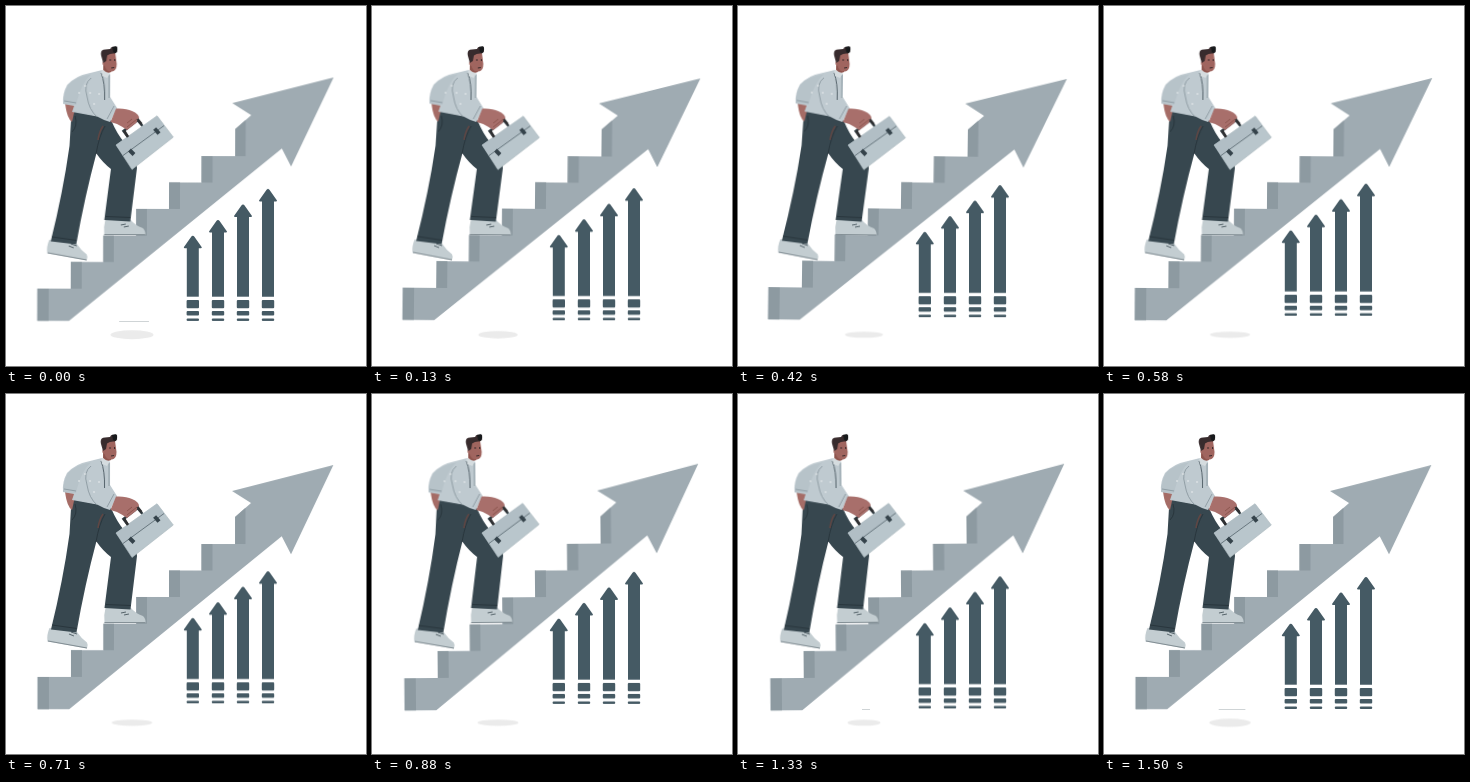
An HTML page that plays this animation: 360 px wide and 360 px high, repeating every 1.54 s.

```html
<!DOCTYPE html>
<html lang="en">
<head>
<meta charset="utf-8">
<title>Climbing the stairs</title>
<style>
  html, body { margin: 0; width: 100%; height: 100%; overflow: hidden; background: #fff; }
  svg { display: block; width: 100%; height: 100%; }
  .sway { animation: sway .77s cubic-bezier(.364, 0, .636, 1) -.435s infinite alternate; }
  .stairs { transform-origin: 179.5px 193px; }
  .man { transform-origin: 104px 147px; }
  .bars { animation: lift .77s cubic-bezier(.364, 0, .636, 1) -.05s infinite alternate; }
  .shadow { transform-origin: 126px 328.7px; animation: shadow 1.54s linear infinite; }
  .glint { transform-origin: 128px 315.5px; animation: glint 1.54s linear infinite; }
  @keyframes sway { from { transform: rotate(-.8deg); } to { transform: rotate(.8deg); } }
  @keyframes lift { to { transform: translateY(-5.7px); } }
  @keyframes shadow {
    0%, 100% { transform: scale(1); }
    16% { transform: scale(.84, .68); }
    38% { transform: scale(.93, .7); }
    57% { transform: scale(.95, .7); }
    73% { transform: scale(.98, .8); }
    86% { transform: scale(.76, .68); }
    97% { transform: scale(.96, .9); }
  }
  @keyframes glint {
    0%, 100% { transform: scaleX(1); }
    8%, 66% { transform: scaleX(0); }
    73% { transform: scaleX(.77); }
    86% { transform: scaleX(.25); }
    97% { transform: scaleX(.87); }
  }
</style>
</head>
<body>
<svg viewBox="0 0 360 360">
  <defs>
    <path id="head" d="M0 0Q1 0 1.6 1L9 11.5Q9 12.5 8 12.5H-8Q-9 12.5-9 11.5L-1.6 1Q-1 0 0 0Z"/>
    <g id="foot">
      <rect x="-6.2" y="294" width="12.4" height="8.2" rx="1"/>
      <rect x="-6.2" y="305" width="12.4" height="4.5" rx="1"/>
      <rect x="-6.2" y="312.4" width="12.4" height="2.6" rx="1"/>
    </g>
  </defs>

  <ellipse class="shadow" cx="126" cy="328.7" rx="21.5" ry="4.5" fill="#ebebeb"/>
  <path class="glint" d="M113 315.5H143" stroke="#cfd4d6"/>

  <g class="sway stairs">
    <path fill="#9fabb2" d="M31.7 283H65V256.3H97.5V229.7H130.3V203H163V176.5H195.5V150H229V123L245 109 226 97 327.3 71 285 160.3 275.7 142.2 63.3 315.2H31.7Z"/>
    <path fill="#8d9aa1" d="M31.7 283H43V315.2H31.7ZM65 256.3H76V283H65ZM97.5 229.7H108V256.3H97.5ZM130.3 203H141V229.7H130.3ZM163 176.5H174V203H163ZM195.5 150H206.5V176.5H195.5ZM229 123 239.5 113.8V150H229Z"/>
  </g>

  <g class="bars" fill="#455a64">
    <g transform="translate(186.8)"><use href="#head" y="229.7"/><path d="M-6 241H6V290.7H-6Z"/><use href="#foot"/></g>
    <g transform="translate(212)"><use href="#head" y="214"/><path d="M-6 225H6V290.7H-6Z"/><use href="#foot"/></g>
    <g transform="translate(237)"><use href="#head" y="198.5"/><path d="M-6 210H6V290.7H-6Z"/><use href="#foot"/></g>
    <g transform="translate(262)"><use href="#head" y="183"/><path d="M-6 194H6V290.7H-6Z"/><use href="#foot"/></g>
  </g>

  <g class="sway man">
    <!-- shoes -->
    <g fill="#c3cdd1">
      <path d="M43.5 234 71 238Q75 244 81 248.5Q82.5 251 81 254.5L41.5 247.5Q40.5 241 43.5 234Z"/>
      <path d="M99.5 214H125Q129 219 137 222Q140 225 139.5 229H98.5Q97.5 221 99.5 214Z"/>
    </g>
    <path d="M42 247 81 254M98.5 228.6H139.5" stroke="#7e8a90"/>
    <path d="M63 240 68 242M65 238 71 240M115 219 120 218M118 221 123 220" stroke="#55636a"/>

    <!-- legs -->
    <path fill="#37474f" d="M88 110 105 114Q111 128 118 136Q131 149 131 162L124.5 215.5 98.5 214 105 163Q97 157 90 147Z"/>
    <path fill="#37474f" d="M65.5 105 101 112Q95 126 90.5 147Q79 190 70.5 238.5L45 235.5Q57 187 63.5 140Z"/>
    <path fill="none" stroke="#29363d" d="M99 120Q93 130 90 148M46 231 71 234.5M100 210.5 125 211.5M69 110Q72 120 66 126"/>
    <path d="M97 120Q93 126 92 134" fill="none" stroke="#604643" stroke-width="1.5"/>

    <!-- rear arm and shirt -->
    <path fill="#a56c66" d="M59 98H70L66 116Q61 113 59 98Z"/>
    <path fill="#bfcad0" d="M96 64Q101 68 104 68L104 91 111 102 104 116Q97 114 91 110.5L66 106 68 100 57 98Q56 88 61 79Q70 69.5 82 67.5Z"/>
    <path fill="#b7c3c9" d="M57 98Q57 88 62 79Q71 70 85 68.5Q75 77 70 99Z"/>
    <path fill="none" stroke="#84929a" stroke-width=".8" d="M85 72Q77 78 81 91Q83 104 91 111M58 95 70 97M103 69 103 92M108 100 101 113"/>
    <path d="M95 67Q99 77 98.5 94" fill="none" stroke="#56646c"/>
    <path fill="#d5dcdf" d="M95 64 104 67 101 72 96 70Z"/>
    <g fill="#eef1f2">
      <circle cx="79" cy="80" r=".8"/><circle cx="73" cy="87" r=".8"/><circle cx="88" cy="98" r=".8"/>
      <circle cx="84" cy="87" r=".8"/><circle cx="93" cy="88" r=".8"/>
    </g>

    <!-- head -->
    <path fill="#8e544d" d="M97 57H105V66Q101 68 97 64Z"/>
    <path fill="#a0655f" d="M97 50Q102 46 109 47L110.5 58Q110.5 65 106 65.5Q100 66 98.5 60Q95 59 97 55Z"/>
    <path fill="#382b2d" d="M97 57 95 50Q93.5 43.5 99 43.5L104 43Q105 40 108 41Q111 39.5 111 42Q111.5 47 108.5 47.5Q104 47 101 49.5L100 55Z"/>
    <path fill="#17191b" d="M106 41Q111 39 111 42Q111.5 46 109 47L107 46Z"/>
    <path d="M104 53V55M108.5 53V55M105 62 108 61.5" stroke="#38292a"/>

    <!-- briefcase -->
    <path fill="none" stroke="#2f3a40" stroke-width="2.6" d="M122 131 117.5 125 131.5 114 136.5 120"/>
    <path fill="#b9c6cc" stroke="#aab7bd" stroke-width=".6" stroke-linejoin="round" d="M110 139 151 109.7 167.3 131 126 163.5Z"/>
    <path fill="#b1bec5" d="M110 139 151 109.7 158 119 117 149Z"/>
    <path d="M117 149.5 158 119.5" stroke="#66757d"/>
    <path d="M148.6 122.5 153 127.5M123.5 144 128 148.5" stroke="#35434b" stroke-width="4"/>
    <path fill="#a86f6b" d="M110 102.5Q120 102 126 105Q133 108 133 112L130 117 121 124Q117 121 111 118L104.5 116Z"/>
    <path fill="none" stroke="#854e47" stroke-width=".8" d="M121 121 131 113M121 117 126 113"/>
    <path d="M118 124.5 122 131M131.5 113 135.5 118" stroke="#2f3032" stroke-width="2.4"/>
  </g>
</svg>
</body>
</html>
```
